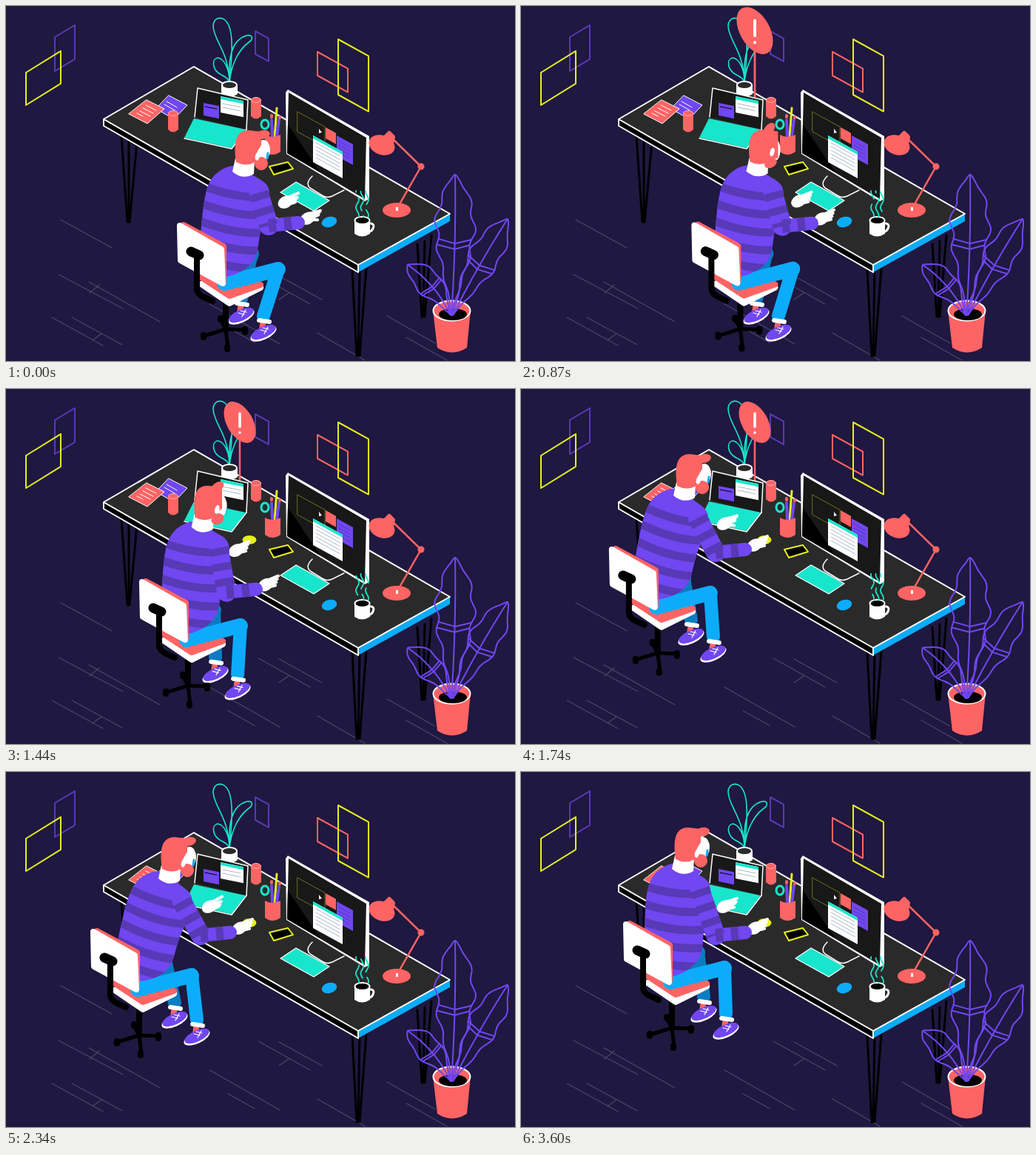
An HTML page that plays this animation: 688x480 px, repeating every 3630 ms.

```html
<!DOCTYPE html>
<html lang="en">
<head>
<meta charset="utf-8">
<title>Two desks, one worker</title>
<style>
html, body { margin: 0; width: 100%; height: 100%; overflow: hidden; background: #1f1840; }
svg { display: block; width: 688px; height: 480px; fill: none; stroke-width: 2; stroke-linecap: round; stroke-linejoin: round; }
.c { fill: #ff6464 } .p { fill: #7047f0 } .t { fill: #18e6cc } .y { fill: #e5f01e }
.b { fill: #0cacfa } .w { fill: #fff } .k { fill: #000 } .g { fill: #2b2a2a } .glass { fill: #181818 }
.sc { stroke: #ff6464 } .sp { stroke: #7047f0 } .sd { stroke: #5839b6 } .st { stroke: #18e6cc }
.sy { stroke: #e5f01e } .sb { stroke: #0cacfa } .sn { stroke: #0c7cc2 } .sw { stroke: #fff }
.sk { stroke: #000 } .so { stroke: #6d7020 } .sg { stroke: #aeb8c6 } .sf { stroke: #4b4569 }
</style>
</head>
<body>
<svg viewBox="0 0 688 480">
  <g class="sf" stroke-width="1.2">
    <path id="planks" d="M71 363l87 46M112 373l96 54M126 377l-13 11"/>
    <path d="M74 289l69 38M62 421l69 38M89 421l68 37M129 443l-12 9M341 364l70 39M369 365l58 32M382 388l-13 9M275 403l95 54M300 435l36 20M421 442l64 37M515 419l65 37M541 448l55 31"/>
  </g>
  <g id="wall"></g>

  <path class="sk" stroke-width="3" d="M156 175L164 292H167L177 184M166 180V292M468 356L474 473H478L487 354M478 358L476 473M556 322L562 420H566L575 310M566 318L564 420"/>
  <path class="g" d="M132 153L254 82L600 281L476 350Z"/>
  <path class="k" d="M132 153L476 350V360L132 162Z"/>
  <path class="b" d="M476 350L600 281V291L476 360Z"/>
  <path class="sw" d="M476 360V350L132 153L254 82L600 281L476 350M132 153V162L476 360"/>

  <path class="st" stroke-width="1.6" d="M302 106C305 70 308 42 301 26C295 12 280 14 280 27C281 48 301 60 302 104C304 80 314 60 327 50C335 45 334 38 325 40C306 46 300 66 302 106C303 86 295 71 286 70C277 72 279 87 291 93C299 97 302 100 302 106"/>
  <path class="w" d="M291 107V119Q302 127 313 119V107Z"/>
  <ellipse class="g sw" cx="302" cy="107" rx="10" ry="5"/>

  <g class="sw" stroke-width="1">
    <path class="p" d="M220 121L245 134L227 153L203 139Z"/>
    <path class="c" d="M190 127L214 139L191 159L166 146Z"/>
    <path d="M217 129l14 8M214 133l14 8M189 134l14 7M185 138l14 7M181 142l14 7M177 145l8 4"/>
  </g>
  <g id="can">
    <path class="c" d="M219 145V167Q226 174 233 167V145Z"/>
    <ellipse class="c" stroke="#ffb0ac" stroke-width="1" cx="226" cy="145" rx="6.5" ry="3.5"/>
  </g>
  <use href="#can" x="112" y="-18"/>

  <g id="sign">
    <path class="sc" stroke-width="2.5" d="M316 60V127"/>
    <ellipse class="c" rx="21.5" ry="25" transform="translate(316 45) skewY(30)"/>
    <path class="sw" stroke-width="3.5" d="M316 33V51M316 59v.1"/>
  </g>

  <path class="glass sw" stroke-width="1.5" d="M255 150L259 111L327 127L325 167"/>
  <path class="t" d="M254 152L324 167L305 192L241 178Z"/>
  <path class="sw" stroke-width="1.5" d="M241 179L305 193L325 167"/>
  <ellipse class="y" cx="329" cy="204" rx="9.5" ry="6"/>

  <ellipse class="st" stroke-width="3" cx="350" cy="160" rx="5" ry="6"/>
  <path class="sy" stroke-width="3" d="M366 138L363 178"/>
  <path class="sp" stroke-width="4" d="M359 154L360 176M369 154L366 176"/>
  <path class="sc" stroke-width="4" d="M359 148v2M370 150v1"/>
  <path class="c" d="M350 174V197Q360 205 371 197V174Q360 180 350 174Z"/>

  <path class="sw" stroke-width="1.5" d="M414 230Q404 240 411 246L429 257Q434 260 441 257L457 249"/>
  <path class="w" d="M378 117L381 113L491 176V261L485 264L379 200Z"/>
  <path class="glass" d="M382 117L487 178L485 261L380 199Z"/>
  <path class="k" d="M381 160L425 225L380 199Z"/>
  <g id="windows"></g>

  <path class="t sw" stroke-width="1.2" d="M392 238L437 263L416 277L371 252Z"/>
  <ellipse class="b" cx="437" cy="292" rx="10.5" ry="7" transform="rotate(-15 437 292)"/>
  <path class="k sy" d="M356 217L381 211L388 220L362 228Z"/>

  <path class="sw" stroke-width="3" d="M493 294Q499 295 496 301Q494 305 491 305"/>
  <path class="w" d="M471 290V308Q481 315 492 308V290Z"/>
  <ellipse class="k sw" cx="481.5" cy="290" rx="10" ry="5"/>
  <g id="steam" class="st" stroke-dasharray="28 8"></g>

  <ellipse class="c" cx="528" cy="276" rx="19" ry="10"/>
  <path class="sc" stroke-width="2.5" d="M529 273L561 217L521 178"/>
  <circle class="c" cx="561" cy="217" r="4.5"/>
  <path class="w" d="M527 272h3v5h-3z"/>
  <ellipse class="c" cx="508" cy="188" rx="18" ry="13" transform="rotate(20 508 188)"/>
  <path class="c sc" stroke-width="6" d="M512 178L518 172L523 177L521 186Z"/>

  <g id="man"></g>

  <path class="c" d="M577 411L583 462Q603 475 623 462L628 411Z"/>
  <ellipse class="c sw" cx="602.5" cy="412" rx="25" ry="13.5"/>
  <ellipse class="k" cx="604" cy="417" rx="19" ry="8"/>
  <g id="plant" class="sp"></g>
</svg>
<script>
const LOOP = 3630;
const $ = id => document.getElementById(id);
const mix = (a, b, u) => a + (b - a) * u;
const mixAll = (a, b, u) => a.map((v, i) => mix(v, b[i], u));
const shift = ([x, y], dx, dy) => [x + dx, y + dy];
const clamp = u => Math.max(0, Math.min(1, u));
const ease = u => u * u * (3 - 2 * u);
const path = (cls, d, width = 2) => `<path class="${cls}" d="${d}" stroke-width="${cls.includes('s') ? width : 0}"/>`;
const line = (cls, points, width) => path(cls, 'M' + points.join('L'), width);
const oval = (cls, x, y, rx, ry, angle = 0) =>
  `<ellipse class="${cls}" rx="${rx}" ry="${ry}" transform="translate(${x} ${y}) rotate(${angle})"/>`;
const group = ([x, y], parts) => `<g transform="translate(${x} ${y})">${parts}</g>`;

// Smooth closed path through points.
function curve(points) {
  const n = points.length;
  const at = i => points[(i + n) % n];
  return 'M' + points[0] + points.map((b, i) => {
    const [a, c, e] = [at(i - 1), at(i + 1), at(i + 2)];
    return `C${b.map((v, k) => v + (c[k] - a[k]) / 6)} ${c.map((v, k) => v - (e[k] - b[k]) / 6)} ${c}`;
  }).join('') + 'Z';
}

// Upright rectangle seen in perspective, and lines of writing on one.
const panel = (cls, x, y, w, h, slope = .55, width = 2) =>
  path(cls, `M${x} ${y}l${w} ${w * slope}v${h}l${-w} ${-w * slope}z`, width);
const rows = (cls, x, y, w, count, slope = .55) => Array.from({ length: count },
  (_, i) => path(cls, `M${x} ${y + i * 5}l${w} ${w * slope}`, 1)).join('');

$('wall').innerHTML = panel('sd', 66, 42, 27, 46, -.6) + panel('sd', 337, 34, 18, 31)
  + panel('sy', 27, 90, 47, 44, -.62) + panel('sc', 421, 62, 41, 32) + panel('sy', 449, 45, 41, 75);

$('windows').innerHTML = panel('p', 267, 131, 21, 17, .2) + rows('sk', 269, 136, 16, 1, .2)
  + panel('w', 290, 122, 31, 22, .2) + panel('t', 290, 122, 31, 4, .2) + rows('sg', 293, 132, 24, 2, .2)
  + panel('so', 394, 143, 37, 27, .55, 1) + panel('c', 432, 164, 14, 15)
  + panel('p', 447, 175, 22, 28) + rows('sd', 450, 183, 15, 4)
  + panel('w', 415, 175, 40, 36) + panel('t', 415, 175, 40, 4) + rows('sg', 419, 185, 32, 5)
  + path('w', 'M423 166l4 5-4 1z');

// Wavy leaf around a bent midrib.
function leaf(base, tip, bend, width) {
  const dx = tip[0] - base[0], dy = tip[1] - base[1], length = Math.hypot(dx, dy);
  const point = (u, side) => {
    const ripple = 1 + .13 * Math.cos(u * length / 6.5 + side);
    const across = bend * 4 * u * (1 - u) + side * width * Math.sin(Math.PI * u ** 1.5) ** .8 * ripple;
    return [base[0] + dx * u - dy / length * across, base[1] + dy * u + dx / length * across];
  };
  const steps = Array.from({ length: 24 }, (_, i) => i / 24);
  const outline = [...steps.map(u => point(u, -1)), tip, ...steps.slice(1).reverse().map(u => point(u, 1))];
  const bands = [.5, .54].map(u => line('', [point(u, -1), point(u - .03, 0), point(u, 1)])).join('');
  return path('s', curve(outline)) + line('s', steps.map(u => point(u, 0)).concat([tip])) + bands.replaceAll('stroke-width="0"', '');
}
$('plant').innerHTML = leaf([602, 418], [607, 228], 2, 25) + leaf([604, 418], [678, 288], -2, 20) + leaf([601, 418], [543, 350], 6, 17);

const monitor = { chair: [0, 0], head: [0, 0], turn: [0], foot: [348, 441], near: [411, 284], far: [381, 262] };
const typing = { ...monitor, turn: [1] };
const alert = { ...typing, chair: [-11, -7], head: [-26, -9], near: [377, 297], far: [338, 239] };
const laptop = { chair: [-112, -80], head: [-100, -80], turn: [0], foot: [260, 357], near: [319, 208], far: [278, 179] };
const settled = { ...laptop, chair: [-117, -81], foot: [258, 357] };
const leaning = { ...laptop, chair: [-113, -82], head: [-106, -82], foot: [277, 349] };
const closer = { ...leaning, chair: [-93, -91], head: [-102, -93] };
const timeline = [
  [60, monitor], [360, typing], [820, typing], [1170, alert], [1230, alert], [1720, laptop],
  [1920, settled], [2400, settled], [2800, leaning], [2840, leaning], [3240, closer], [LOOP, closer]
];

function poseAt(t) {
  const i = timeline.findIndex(([time]) => time >= t);
  if (i < 1) return monitor;
  const [t0, a] = timeline[i - 1], [t1, b] = timeline[i];
  const u = ease((t - t0) / (t1 - t0));
  return Object.fromEntries(Object.keys(a).map(key => [key, mixAll(a[key], b[key], u)]));
}

function drawHead(offset, turn) {
  const right = mix(345, 349, turn);
  return group(offset,
    path('w', 'M310 206L336 209L335 227Q320 236 306 224Z')
    + oval('w', mix(348, 346, turn), 195, mix(9, 6, turn), 14)
    + oval('c', mix(345, 339, turn), 213, 9, mix(9, 6, turn), -30)
    + path('c', `M311 211C308 190 308 168 328 168L${right} 170L${right} ${mix(188, 206, turn)}L339 ${mix(198, 208, turn)}L337 211Q324 218 311 211Z`)
    + oval('c', mix(347, 337, turn), mix(174, 167, turn), 10, 6, mix(-12, -50, turn))
    + oval('w', 340 + turn, 203 - 5 * turn, 3, 6, 15)
    + `<g opacity="${1 - turn}">${path('sb', 'M354 199L353 206', 3)}</g>`);
}

function leg(cls, hip, knee, foot) {
  const shoe = oval('w', 0, 2, 19, 8, -25) + oval('p', 0, 0, 18, 7.5, -25) + path('sw', 'M-4-3l8 2M-1-6l8 2M1 2l5-9', 1.2);
  return group(foot, path('sc', 'M-1-10L-2-2', 8) + shoe)
    + line(cls, [hip, knee], 20) + line(cls, [knee, shift(foot, 0, -22)], 18)
    + path('sw', `M${shift(foot, -6, -16)}l14 2`, 6);
}

function drawHand(at, t, busy) {
  const fingers = [0, 1, 2, 3].map(i => {
    const tap = busy * 1.6 * Math.sin(t / 38 + i * 1.9);
    return path('sw', `M${2 + i} ${i * 3 - 4}L${14 - i * 1.3} ${i * 4.3 - 9 + tap}`, 4);
  }).join('');
  return group(at, oval('w', -3, 3, 11, 8, -30) + fingers);
}

// Sweater laid out along the spine, with the near arm hanging from it.
function drawSweater(neck, hip, hand) {
  const sx = hip[0] - neck[0], sy = hip[1] - neck[1], length = Math.hypot(sx, sy);
  const at = (across, u) => [neck[0] + sx * u + sy / length * across, neck[1] + sy * u - sx / length * across];
  const body = curve([
    at(-15, -.04), at(-44, .12), at(-53, .5), at(-50, .96), at(-18, 1.08),
    at(18, .92), at(27, .6), at(36, .2), at(14, .05)
  ]);
  const stripes = [.22, .4, .58, .76, .94].map(u => `M${at(-60, u - .06)}Q${at(0, u + .1)} ${at(45, u + .02)}`).join('');
  const shoulder = at(22, .22), elbow = shift(hand, -56, 13), wrist = shift(hand, -16, 9);
  return `<clipPath id="body"><path d="${body}"/></clipPath>${path('p', body)}
    <g clip-path="url(#body)">${path('sd', stripes, 11)}</g>
    ${line('sp', [shoulder, elbow], 26)}${line('sp', [elbow, wrist], 18)}
    <g stroke-linecap="butt" stroke-dasharray="10 11">${line('sd', [shoulder, elbow], 26)}${line('sd', [elbow, wrist], 18)}</g>`;
}

const chairBase = path('sk', 'M297 396V437', 8)
  + path('sk', 'M297 437L268 446M297 437L300 462M297 437L324 438M297 437L290 424', 5)
  + path('sk', 'M267 445v3M299 461v3M323 437v4M290 422v2', 8)
  + path('w sw', 'M264 376L300 362L344 381L302 402Z', 8)
  + path('c sc', 'M264 367L300 354L344 377L302 392Z', 8);
const chairBack = path('c sc', 'M240 296L294 325V373L240 342Z', 8)
  + path('w sw', 'M235 297L291 329L293 375L236 344Z', 8)
  + path('sk', 'M250 332L261 337', 13)
  + path('sk', 'M258 340V382Q258 390 268 394L279 399', 8);

function drawMan(t) {
  const { chair, head, turn, foot, near, far } = poseAt(t);
  const seated = (x, y) => shift(chair, x, y);
  const atMonitor = t < 820, atLaptop = t > 1720;
  $('man').innerHTML = leg('sn', seated(320, 365), seated(332, 335), shift(foot, -30, -23))
    + group(chair, chairBase)
    + leg('sb', seated(295, 375), seated(368, 356), foot)
    + drawHand(far, t, atMonitor || atLaptop)
    + drawHand(near, t + 60, atMonitor)
    + drawSweater(shift(head, 321, 222), seated(315, 356), near)
    + drawHead(head, turn[0]) + group(chair, chairBack);
}

function drawSign(t) {
  const u = clamp((t - 690) / 330) - 1;
  const grow = 1 + 3.1 * u ** 3 + 2.1 * u ** 2;
  const scale = Math.max(0, grow * (1 - ease(clamp((t - 1980) / 200))));
  $('sign').setAttribute('transform', `translate(316 127) scale(${scale}) translate(-316 -127)`);
}

function drawSteam(t) {
  $('steam').innerHTML = [0, 1, 2].map(i => {
    const points = [];
    for (let y = 285; y > 249; y--) points.push([475 + i * 6.5 + 2 * Math.sin(y / 3.4), y]);
    return `<g stroke-dashoffset="${-t * 36 / 1210 - i * 9}">${line('st', points, 1.8)}</g>`;
  }).join('');
}

function frame() {
  const t = performance.now() % LOOP;
  drawMan(t);
  drawSign(t);
  drawSteam(t);
  requestAnimationFrame(frame);
}
frame();
</script>
</body>
</html>
```
